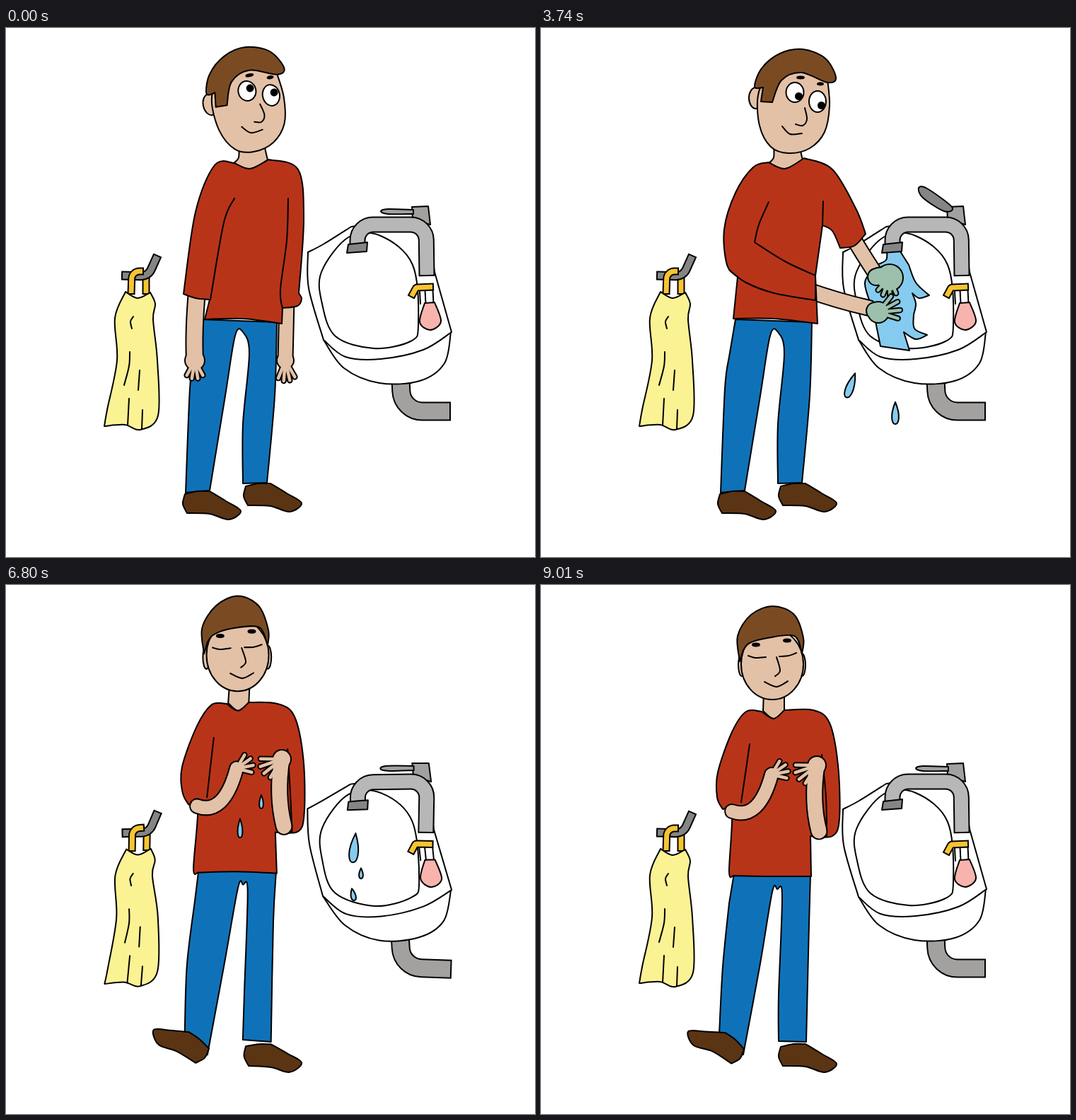
These frames come from a looping animation (748x748 px, 9.18 s). An HTML page with a canvas:

```html
<!DOCTYPE html>
<html lang="en">
<meta charset="utf-8">
<title>Washing hands</title>
<style>
html, body { margin: 0; width: 100%; height: 100%; overflow: hidden; background: #fff }
canvas { display: block }
</style>
<canvas id="stage" width="748" height="748"></canvas>
<script>
const STEP = 170, STEPS = 54;
const SKIN = '#e3c1a7', HAIR = '#7a4b23', RED = '#b83419', BLUE = '#0f72b8', SHOE = '#5b3413',
  TOWEL = '#fbf294', GOLD = '#f7c431', WATER = '#85cbf0', SOAPY = '#9cc0ab', PINK = '#f8b3ad',
  GREY = '#a3a19f', LIGHT = '#b7b7b7', DARK = '#858585';
const ctx = document.getElementById('stage').getContext('2d');
let alt = false; // second drawing of each pose

// Redrawn lines wobble a little.
const wobble = ([x, y]) => alt
  ? [x + 1.2 * Math.sin(y / 23 + x / 40), y + 1.2 * Math.sin(x / 19)] : [x, y];

// Smooth curve through "x,y" points; "!" marks a corner, a final "z" closes it.
function trace(text) {
  const words = text.split(' '), n = words.length, closed = text.endsWith('z');
  const at = i => closed ? (i + n) % n : Math.max(0, Math.min(n - 1, i));
  const pts = words.map(w => wobble(w.split(',').map(parseFloat)));
  const corner = i => words[at(i)].includes('!');
  ctx.beginPath();
  ctx.moveTo(...pts[0]);
  for (let i = 0; i < (closed ? n : n - 1); i++) {
    const a = pts[at(i)], b = pts[at(i + 1)];
    const before = corner(i) ? a : pts[at(i - 1)], after = corner(i + 1) ? b : pts[at(i + 2)];
    ctx.bezierCurveTo(a[0] + (b[0] - before[0]) / 6, a[1] + (b[1] - before[1]) / 6,
      b[0] - (after[0] - a[0]) / 6, b[1] - (after[1] - a[1]) / 6, b[0], b[1]);
  }
  if (closed) ctx.closePath();
}
function paint(fill) {
  ctx.fillStyle = fill;
  ctx.fill();
  ctx.stroke();
}
function shape(fill, text) { trace(text); paint(fill); }
function lines(...texts) { for (const t of texts) { trace(t); ctx.stroke(); } }
function oval(fill, x, y, rx, ry) {
  ctx.beginPath();
  ctx.ellipse(...wobble([x, y]), rx, ry, 0, 0, 7);
  paint(fill);
}
const dot = (x, y, rx, ry) => oval('#000', x, y, rx - 1, ry - 1);

// Draws in a moved, turned and possibly mirrored frame.
function place(x, y, turn, mirror, draw) {
  ctx.save();
  ctx.translate(x, y);
  ctx.rotate(turn);
  ctx.scale(mirror, 1);
  draw();
  ctx.restore();
}
const sway = (dx, dy, draw) => place(alt ? dx : 0, alt ? dy : 0, 0, 1, draw);

// Outlined bar of constant width with rounded bends.
function bar(fill, width, radius, ...pts) {
  const end = pts.length - 1;
  const beyond = ([x, y], [u, v], d) => {
    const k = d / Math.hypot(x - u, y - v);
    return [x + (x - u) * k, y + (y - v) * k];
  };
  ctx.save();
  ctx.lineCap = 'butt';
  for (const [color, grow] of [['#000', 1], [fill, -1]]) {
    ctx.beginPath();
    ctx.moveTo(...wobble(beyond(pts[0], pts[1], grow)));
    for (let i = 1; i < end; i++) ctx.arcTo(...wobble(pts[i]), ...wobble(pts[i + 1]), radius);
    ctx.lineTo(...wobble(beyond(pts[end], pts[end - 1], grow)));
    ctx.strokeStyle = color;
    ctx.lineWidth = width + 2 * grow;
    ctx.stroke();
  }
  ctx.restore();
}

// Forearm bending from a over b to the palm at c, with a fan of four fingers.
function arm(fill, width, [a, b, c], palm = 0, angle = 0, spread = 0, reach = 0) {
  ctx.save();
  for (const [color, grow] of [['#000', 1], [fill, -1]]) {
    ctx.strokeStyle = ctx.fillStyle = color;
    ctx.lineWidth = width + 2 * grow;
    ctx.beginPath();
    ctx.moveTo(...a);
    ctx.quadraticCurveTo(...b, ...c);
    ctx.stroke();
    if (!palm) continue;
    ctx.beginPath();
    ctx.arc(...c, palm + grow, 0, 7);
    ctx.fill();
    ctx.lineWidth = 6.5 + 2 * grow;
    for (let i = -1.5; i < 2; i++) {
      const turn = angle + i * spread, length = reach - 2 * Math.abs(i);
      ctx.beginPath();
      ctx.moveTo(...c);
      ctx.lineTo(c[0] + length * Math.cos(turn), c[1] + length * Math.sin(turn));
      ctx.stroke();
    }
  }
  ctx.restore();
}
function drop(x, y, w, h, turn = 0) {
  place(x, y, turn, 1, () => {
    ctx.beginPath();
    ctx.moveTo(0, -h / 2);
    ctx.bezierCurveTo(w, h * .65, -w, h * .65, 0, -h / 2);
    paint(WATER);
  });
}

function basin() {
  bar(GREY, 25, 30, [558, 495], [560, 542], [628, 542]);
  shape('#fff', '449,441! 478,481 528,502 585,499 620,474 629,430!z');
  shape('#fff', '488,281! 450,305 427,317! 428,368 449,441! 480,465 530,468 590,455 630,430! 606,345! 595,278! 515,277!z');
  shape('#fff', '484,296 446,345 447,390 466,436 520,453 572,443 583,420 575,335 530,294z');
}
function tap(open) {
  shape(GREY, '574,253! 597,252! 600,278! 575,271!z');
  shape(open ? DARK : GREY, open
    ? '534,226 546,227 581,253 570,259 540,240z'
    : '530,259 540,256 576,257! 576,263! 540,263z');
  bar(LIGHT, 21, 22, [497, 308], [497, 278], [594, 278], [595, 350]);
  shape(DARK, '484,306! 511,303! 510,316! 482,318!z');
}
function dispenser() {
  lines('585,373 586,390');
  bar('#fff', 11, 0, [598, 370], [599, 390]);
  bar(GOLD, 9, 3, [573, 380], [580, 367], [604, 366]);
  shape(PINK, '592,389! 606,388! 615,415 600,427 585,416z');
}
function hangingTowel() {
  bar(GOLD, 9, 0, [198, 352], [198, 376]);
  bar(DARK, 11, 16, [164, 350], [201, 351], [214, 322]);
  bar(GOLD, 9, 11, [177, 376], [178, 344], [194, 344]);
  shape(TOWEL, '169,373! 186,382 204,374! 211,390 208,412 214,470 215,548 190,568 168,561 139,563! 143,540 157,470 154,410z');
  lines('180,408 176,415 178,425', '175,458 174,478 167,505', '189,484 187,512', '174,524 172,562', '193,540 192,567');
}

const shoe = () => shape(SHOE, '0,0! 18,-4 35,-4! 58,10 79,24 62,36 35,28 3,27! -3,14z');

// Looking down at the basin; other views are this head turned or mirrored.
function head(gazeX, gazeY) {
  oval(SKIN, 304, 99, 10, 15);
  shape(SKIN, '307,95 309,138 325,168 350,177 380,170 401,147 408,110 405,72! 365,50 322,70z');
  shape(HAIR, '311,104! 314,84! 302,83 312,57 338,36 370,30 402,43 417,70 405,77 368,63 340,74 327,105!z');
  for (const [x, y, rx, ry] of [[359, 91, 12.5, 14], [391, 104, 12, 15]]) {
    oval('#fff', x, y, rx, ry);
    dot(x + gazeX, y + gazeY, 5.5, 5.5);
  }
  dot(367, 70, 6, 2.5);
  dot(395, 79, 5, 2.5);
  lines('373,113 376,129 370,138 360,136', '341,139 352,150 369,149');
}
function legs() {
  shape(BLUE, '275,412! 383,416! 380,520 369,643! 335,644! 335,560 344,460 335,430 324,435 310,520 288,654! 254,657! 260,510 266,465!z');
  place(253, 659, 0, 1, shoe);
  place(339, 648, 0, 1, shoe);
}
const neck = () => shape(SKIN, '329,165! 329,183 322,191! 345,199 370,187! 365,165!z');
function reachingBody() {
  legs();
  neck();
  shape(RED, '322,190! 300,197 275,233 259,285 263,335 278,352! 272,411! 330,411 391,418! 388,350! 398,279! 412,287 423,311! 443,308 459,291! 445,255 412,200 372,184! 345,199z');
  lines('266,342 290,360 330,375 388,385! 388,350! 345,330 302,303! 308,278 322,246', '399,245 398,279');
}

const stand = {
  man() {
    legs();
    arm(SKIN, 24, [[270, 372], [265, 430], [267, 470]], 14, 1.57, .33, 27);
    arm(SKIN, 21, [[397, 385], [396, 430], [395, 470]], 12, 1.5, .3, 30);
    neck();
    shape(RED, '323,191! 295,194 268,260 251,376! 268,382 288,384! 281,412! 335,411 390,418! 391,396! 412,393 418,383 414,375! 421,270 413,200 371,186! 345,199z');
    lines('323,241 308,275 289,384', '399,241 397,300 388,370 391,397');
    place(350, 175, -.21, 1, () => place(-350, -177, 0, 1, () => head(5, -3)));
  }
};

const takeSoap = {
  inSink() {
    arm(SKIN, 16, [[472, 293], [515, 295], [542, 312]], 11, .62, .3, 40);
    sway(0, 4, () => shape(WATER, '486,317! 479,350 484,370 480,420 496,428! 495,443 512,443 518,431! 536,420 530,405! 532,380 515,350! 516,335 508,317!z'));
  },
  man() {
    legs();
    arm(SKIN, 20, [[412, 372], [490, 392], [556, 393]], 12, .02, .27, 26);
    neck();
    shape(RED, '322,188! 292,206 284,240 272,411! 340,411 391,418! 386,386! 422,388! 427,372 426,360! 393,344! 392,310 400,258! 425,270 448,295! 465,300 478,292 491,275! 480,258! 430,212 373,183! 345,198z');
    lines('284,245 293,295 325,358 386,386', '333,249 352,308 393,344', '399,245 400,258');
    place(0, 2, 0, 1, () => head(5, 4));
  }
};

const wash = {
  inSink() {
    shape(WATER, '489,316! 488,328 475,335! 458,360 470,400! 480,450! 521,456! 513,430! 530,440 546,434! 528,425 527,405! 530,390 525,375! 535,382 549,378! 530,360 520,335! 508,316!z');
  },
  man() {
    arm(SKIN, 21, [[440, 295], [455, 320], [470, 343]]);
    sway(-3, 5, () => arm(SOAPY, 24, [[474, 352], [482, 348], [493, 353]], 19, 1.75, .38, 27));
    arm(SKIN, 22, [[375, 370], [420, 386], [464, 396]]);
    sway(4, -5, () => arm(SOAPY, 24, [[472, 400], [474, 401], [477, 402]], 15, -.3, .4, 32));
    reachingBody();
    head(5.5, 5.5);
    sway(-3, 12, () => {
      drop(437, 508, 19, 42, .35);
      drop(501, 547, 17, 36);
    });
  }
};

const walk = {
  inSink(wet) {
    if (!wet) return;
    drop(492, 375, 22, 48, .1);
    drop(502, 409, 10, 17);
    drop(491, 439, 12, 20, -.2);
  },
  man(wet) {
    ctx.save();
    if (alt) ctx.transform(1, 0, 0, 1.02, 0, -13.8);
    shape(BLUE, '273,408! 381,410! 379,480 375,646! 336,645! 336,580 341,440 334,430 327,434 310,535 286,664! 272,652 252,635! 257,540 266,450!z');
    place(287, 656, .6, -1, shoe);
    place(339, 653, 0, 1, shoe);
    shape(SKIN, '315,150! 314,178! 329,189 344,178! 344,150!z');
    shape(RED, '312,179! 290,179 270,208 250,265 249,300 257,317! 270,322 266,405 272,411! 325,412 382,412! 381,355! 412,355 422,330 420,255 408,195 385,177 344,177! 329,189z');
    lines('295,225 290,260 283,307', '404,355 403,300 397,240');
    arm(SKIN, 20, [[270, 320], [308, 334], [326, 268]], 9, -.4, .42, 25);
    arm(SKIN, 23, [[393, 348], [382, 305], [390, 255]], 13, 2.65, .34, 33);
    for (const x of [284, 369]) oval(SKIN, x, 113, 5, 16);
    oval(SKIN, 327, 112, 44, 50);
    shape(HAIR, '281,108! 278,72 297,42 328,30 358,42 371,75 369,97! 358,72 320,75 295,82 286,92!z');
    dot(304, 84.5, 6, 3);
    dot(348, 78.5, 6, 3);
    lines('293,100 303,103 318,102', '337,101 350,100 361,96', '333,102 338,121 331,129', '316,137 333,144 349,136');
    ctx.restore();
    if (wet) sway(0, 10, () => {
      drop(331, 336, 12, 31);
      drop(361, 298, 10, 22);
    });
  }
};

const dry = {
  holdsTowel: true,
  man() {
    bar(DARK, 11, 0, [162, 351], [180, 351]);
    bar(GOLD, 9, 8, [177, 350], [182, 359], [198, 358]);
    arm(SKIN, 22, [[186, 300], [178, 310], [172, 318]]);
    place(622, -7, 0, -1, () => {
      reachingBody();
      head(0, 8);
    });
    sway(-3, 6, () => {
      shape(TOWEL, '213,258 238,251 267,268 274,300 286,332 276,360 284,393 245,413 208,400! 210,380 201,378! 200,350 170,338! 187,295z');
      lines('214,305 204,325 200,350', '232,294 232,320 230,357', '252,303 251,325 257,360');
    });
  }
};

// Each scene runs until step "end"; "odd" is the parity of its main drawing.
const scenes = [
  { end: 8, pose: stand, odd: 0 },
  { end: 18, pose: takeSoap, odd: 0, open: true },
  { end: 36, pose: wash, odd: 0, open: true },
  { end: 42, pose: walk, odd: 1, wet: true },
  { end: 50, pose: dry, odd: 1 },
  { end: STEPS, pose: walk, odd: 1 }
];

function render(step) {
  const { pose, odd, open, wet } = scenes.find(s => step < s.end);
  alt = step % 2 !== odd;
  ctx.fillStyle = '#fff';
  ctx.fillRect(0, 0, 748, 748);
  ctx.strokeStyle = '#000';
  ctx.lineWidth = 2;
  ctx.lineJoin = ctx.lineCap = 'round';
  basin();
  pose.inSink?.(wet);
  tap(open);
  dispenser();
  if (!pose.holdsTowel) hangingTowel();
  pose.man(wet);
}

let shown = -1;
function tick() {
  const step = Math.floor(performance.now() / STEP) % STEPS;
  if (step !== shown) render(shown = step);
  requestAnimationFrame(tick);
}
tick();
</script>
</html>
```
